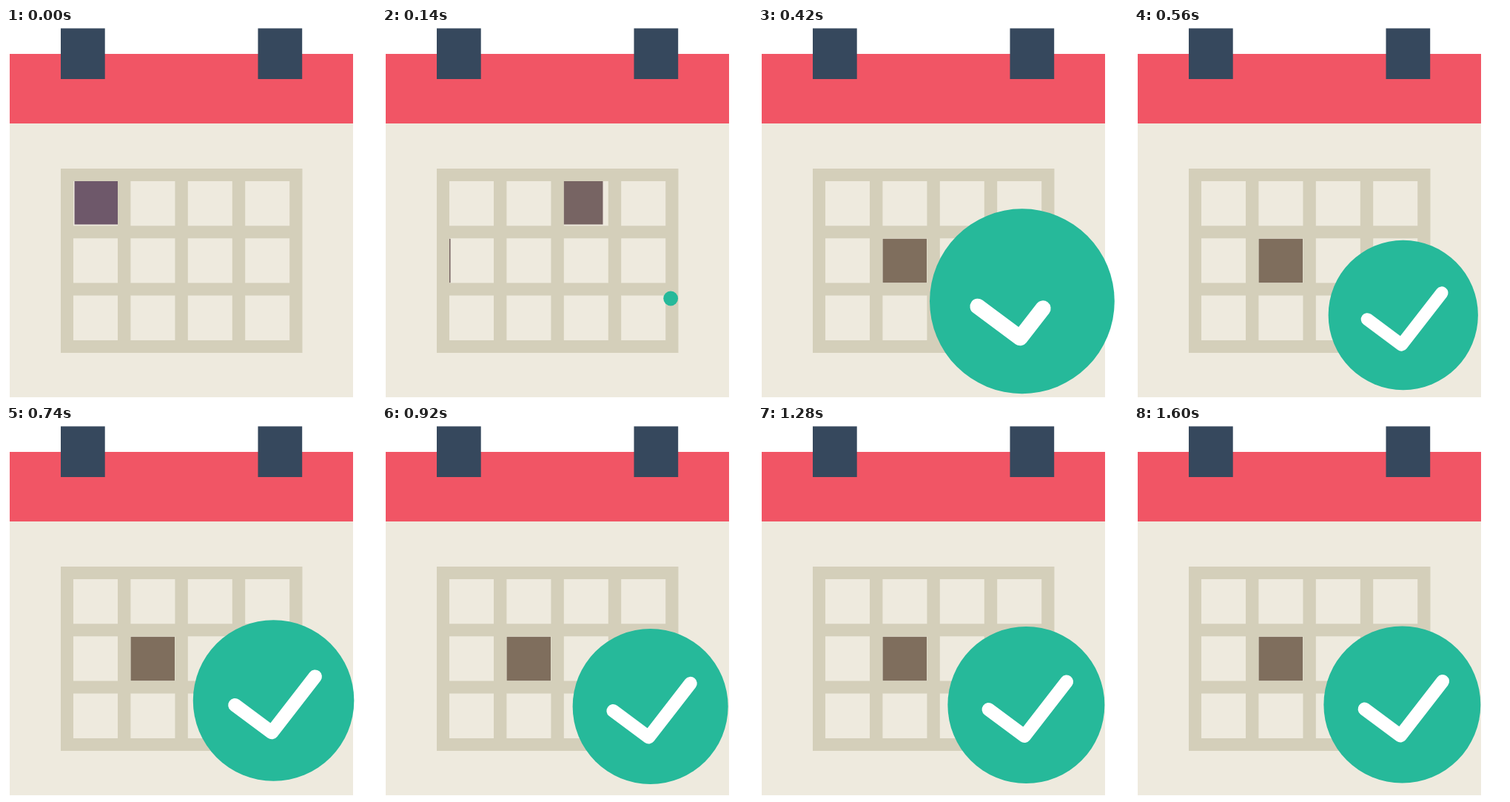
These frames come from a looping animation (500 px wide and 500 px high, 1.62 s). An HTML page with a canvas:

```html
<!DOCTYPE html>
<html lang="en">
<head>
<meta charset="utf-8">
<title>Calendar check</title>
<style>
  html, body { margin: 0; width: 100%; height: 100%; overflow: hidden; background: #fff; }
  canvas { display: block; width: 500px; height: 500px; }
</style>
</head>
<body>
<canvas id="stage" width="500" height="500"></canvas>
<script>
const ctx = document.getElementById('stage').getContext('2d');
const LOOP = 1620;
const SPEED = 1.046; // highlight speed, px per ms

// [time, value] turning points of the springy badge
const RADIUS = [[90, 0], [375, 128.5], [570, 101], [740, 108.8], [910, 105], [1080, 106.3], [1250, 106]];
const CENTER_Y = [[370, 365.5], [560, 388], [740, 371], [920, 379], [1100, 375.7], [1280, 377], [1460, 376.5]];

const clamp = (v, lo = 0, hi = 1) => Math.min(hi, Math.max(lo, v));
const mix = (a, b, u) => a + (b - a) * u;

function swing(keys, t) {
  if (t <= keys[0][0]) return keys[0][1];
  for (let i = 1; i < keys.length; i++) {
    const [t0, a] = keys[i - 1], [t1, b] = keys[i];
    if (t < t1) return mix(a, b, (1 - Math.cos(Math.PI * (t - t0) / (t1 - t0))) / 2);
  }
  return keys[keys.length - 1][1];
}

function box(color, x, y, w, h) {
  ctx.fillStyle = color;
  ctx.fillRect(x, y, w, h);
}

const cells = new Path2D();
for (let row = 0; row < 3; row++)
  for (let col = 0; col < 4; col++)
    cells.rect(91 + col * 77.4, 207 + row * 77.3, 60, 60.3);

function drawCalendar(t) {
  box('#fff', 0, 0, 500, 500);
  box('#eeeade', 5, 129, 464, 370);
  box('#f15565', 5, 35, 464, 94);
  for (const x of [74, 340.5]) box('#36485d', x, 0.5, 59.7, 68.5);
  box('#d4cfba', 74, 190, 326.5, 249);
  ctx.fillStyle = '#eeeade';
  ctx.fill(cells);

  const u = clamp(t / 260);
  const color = `rgb(${mix(110, 127, u)}, ${mix(88, 110, u)}, ${mix(106, 93, u)})`;
  ctx.save();
  ctx.clip(cells);
  box(color, 91.5 + SPEED * t, 207, 59.5, 58.5);
  box(color, Math.min(168.3, 157.3 + SPEED * (t - 260)), 284.7, 59.7, 59.7);
  ctx.restore();
}

function drawBadge(t) {
  const r = swing(RADIUS, t);
  if (r <= 0) return;
  ctx.save();
  ctx.translate(393 - 0.289 * r, swing(CENTER_Y, t));
  ctx.scale(r / 106, r / 106);
  ctx.fillStyle = '#26b99a';
  ctx.beginPath();
  ctx.arc(0, 0, 106, 0, Math.PI * 2);
  ctx.fill();

  const drawn = clamp((t - 300) / 180) * 153.4;
  if (drawn > 0) {
    const down = clamp(drawn / 60.4), up = clamp((drawn - 60.4) / 93);
    ctx.beginPath();
    ctx.moveTo(-50.8, 6);
    ctx.lineTo(mix(-50.8, -2.3, down), mix(6, 42, down));
    if (up > 0) ctx.lineTo(mix(-2.3, 54.7, up), mix(42, -31.5, up));
    ctx.strokeStyle = '#fff';
    ctx.lineWidth = 18;
    ctx.lineCap = ctx.lineJoin = 'round';
    ctx.stroke();
  }
  ctx.restore();
}

function frame() {
  const t = performance.now() % LOOP;
  drawCalendar(t);
  drawBadge(t);
  requestAnimationFrame(frame);
}
frame();
</script>
</body>
</html>
```
